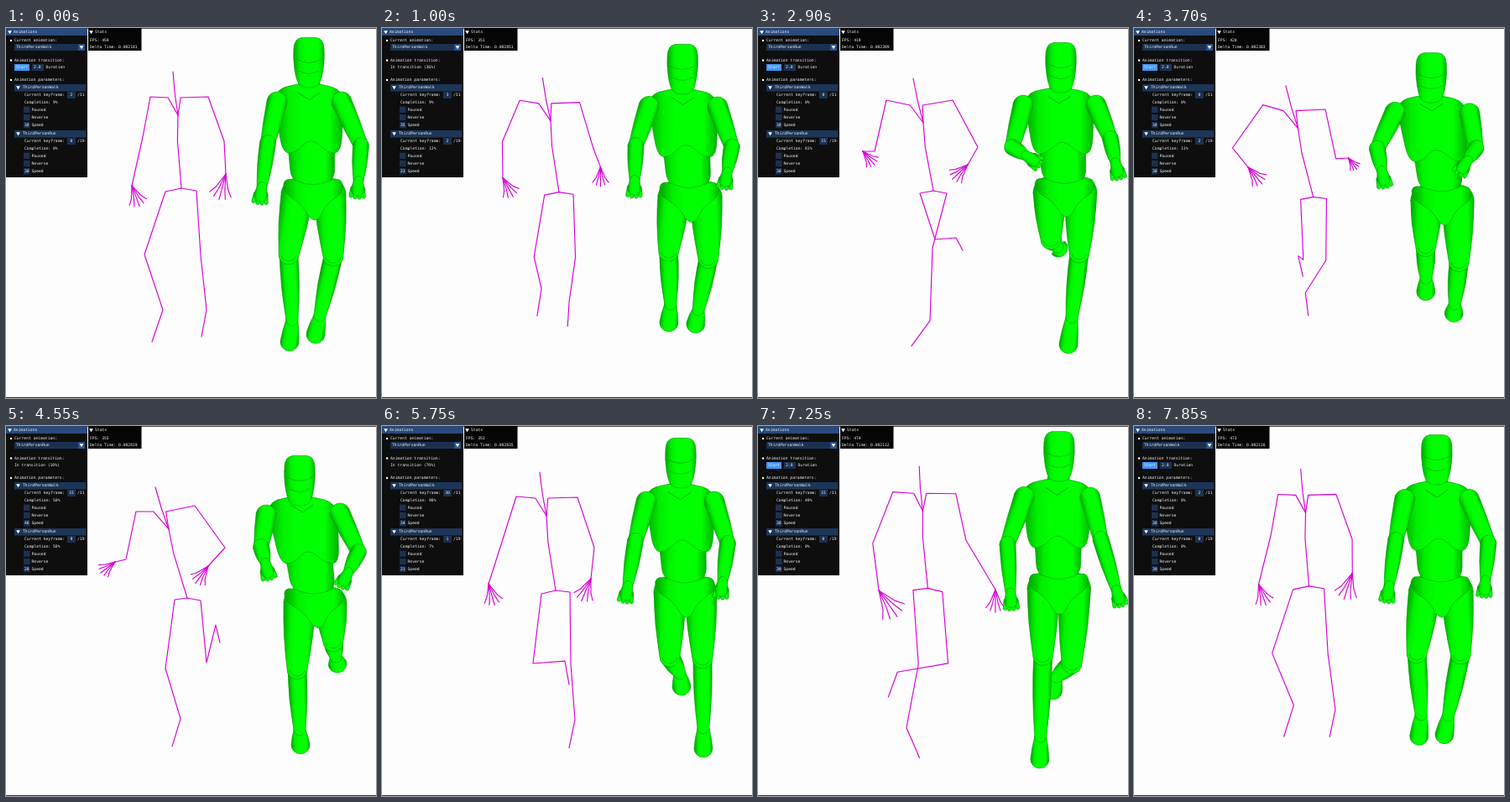
These frames come from a looping animation (441 by 441 pixels, 7.9 s). An HTML page with a canvas:

```html
<!DOCTYPE html>
<html lang="en">
<head>
<meta charset="utf-8">
<title>Animation blending</title>
<style>
html, body { margin: 0; width: 100%; height: 100%; overflow: hidden; background: #fdfdfd; }
canvas { display: block; width: 441px; height: 441px; }
</style>
</head>
<body>
<canvas id="stage"></canvas>
<script>
const LOOP = 7900, STEP = 50, SIZE = 441, SCALE = Math.max(1, window.devicePixelRatio || 1);
const canvas = document.getElementById('stage');
canvas.width = canvas.height = SIZE * SCALE;
const ctx = canvas.getContext('2d');

// ---------- poses ----------
const points = (...n) => n.flatMap((x, i) => i % 2 ? [] : [[x, n[i + 1]]]);
const mix = (a, b, k) => a.map(([x, y], i) => [x + (b[i][0] - x) * k, y + (b[i][1] - y) * k]);

// Swaps the sides; arms reflect about the shoulders, legs about the hips.
function mirror(pose, mid, arm) {
  const n = (pose.length - mid) / 2;
  const L = pose.slice(mid, mid + n), R = pose.slice(mid + n);
  const flip = side => side.map(([x, y], i) => {
    const k = i < arm ? 0 : arm;
    return [L[k][0] + R[k][0] - x, y];
  });
  return [...pose.slice(0, mid), ...flip(R), ...flip(L)];
}

// Periodic cubic through keys [phase, pose].
function cycle(keys, phase) {
  const n = keys.length;
  const key = i => {
    const turn = Math.floor(i / n), [t, p] = keys[i - turn * n];
    return [t + turn, p];
  };
  let i = -1;
  while (key(i + 1)[0] <= phase) i++;
  const [k0, k1, k2, k3] = [i - 1, i, i + 1, i + 2].map(key);
  const d = k2[0] - k1[0], u = (phase - k1[0]) / d, u2 = u * u, u3 = u2 * u;
  const value = (j, c) => {
    const a = k0[1][j][c], b = k1[1][j][c], e = k2[1][j][c], f = k3[1][j][c];
    const m1 = (e - a) / (k2[0] - k0[0]) * d, m2 = (f - b) / (k3[0] - k1[0]) * d;
    return (2 * u3 - 3 * u2 + 1) * b + (u3 - 2 * u2 + u) * m1 + (3 * u2 - 2 * u3) * e + (u3 - u2) * m2;
  };
  return k1[1].map((_, j) => [value(j, 0), value(j, 1)]);
}

function rig(mid, arm, { land, swing, pass, drive, push, float }) {
  const m = p => mirror(p, mid, arm);
  const run = [[.002, m(push)], [.315, m(float)], [.386, drive], [.502, push], [.815, float], [.886, m(drive)]];
  // The passing pose was seen at 35% run; take the run share out of it.
  const step = mix(cycle(run, .027), pass, 1 / .651);
  const walk = [[.027, step], [.095, land], [.408, m(swing)], [.527, m(step)], [.595, m(land)], [.908, swing]];
  return (phase, k) => mix(cycle(walk, phase), cycle(run, phase), k);
}

// head, neck, pelvis, then per side: shoulder, elbow, wrist, hand, hip, knee, ankle, toe
const stickPose = rig(3, 4, {
  land: points(199,52, 205,104, 209,191,
    172,82, 163,130, 150,188, 159,212, 190,195, 165,270, 187,336, 174,374,
    241,82, 260,135, 262,174, 254,204, 227,194, 232,271, 239,336, 233,368),
  swing: points(192,58, 198,111, 205,199,
    158,89, 129,140, 103,178, 98,200, 189,202, 195,275, 227,290, 234,318,
    234,88, 255,145, 271,196, 268,218, 222,202, 211,283, 208,368, 197,405),
  pass: points(188,55, 196,107, 207,196,
    160,84, 143,138, 127,188, 134,213, 190,200, 180,283, 218,280, 223,308,
    233,85, 253,145, 249,182, 238,208, 224,198, 225,284, 230,350, 223,384),
  drive: points(177,68, 192,120, 214,201,
    158,96, 157,150, 133,178, 137,198, 197,205, 182,282, 185,366, 174,398,
    223,93, 255,150, 226,154, 206,170, 231,204, 242,263, 256,243, 258,259),
  push: points(178,73, 194,123, 216,205,
    155,102, 143,159, 130,162, 113,175, 201,207, 190,289, 208,349, 198,382,
    225,95, 261,145, 241,167, 226,187, 232,208, 239,282, 250,237, 255,258),
  float: points(185,60, 197,113, 209,194,
    153,86, 139,147, 125,147, 139,163, 193,197, 211,252, 236,250, 244,265,
    232,86, 262,142, 250,163, 232,180, 225,197, 208,262, 205,349, 183,379)
});

// head, then per side: shoulder, elbow, wrist, hip, knee, ankle, toe
const bodyPose = rig(1, 3, {
  land: points(361,41,
    323,88, 312,137, 305,189, 347,198, 337,270, 341,348, 338,374,
    400,88, 423,140, 420,182, 386,198, 390,272, 374,343, 369,365),
  swing: points(360,48,
    318,94, 291,150, 281,180, 345,203, 350,275, 360,306, 360,319,
    401,94, 417,150, 422,195, 385,203, 383,280, 377,385, 377,406),
  pass: points(356,44,
    315,90, 302,137, 293,190, 343,198, 343,275, 355,295, 357,310,
    396,90, 412,140, 406,185, 380,198, 382,277, 383,360, 383,384),
  drive: points(350,58,
    318,100, 312,143, 306,180, 350,209, 347,287, 346,366, 347,396,
    398,98, 420,148, 402,157, 387,207, 389,245, 382,258, 380,269),
  push: points(350,65,
    310,106, 304,144, 309,163, 350,211, 347,290, 350,362, 351,380,
    398,104, 420,150, 408,174, 387,211, 390,257, 393,275, 395,283),
  float: points(361,47,
    316,92, 303,142, 319,152, 347,196, 349,252, 357,261, 358,262,
    403,92, 420,132, 426,160, 385,196, 383,268, 374,345, 370,377)
});

// ---------- timeline ----------
const WALK = 1.033, RUN = .633, GAP = WALK - RUN;
function stateAt(t) {
  const turns = (a, b) => 2 / GAP * Math.abs(Math.log(a / b));
  if (t < 280) return { phase: .095 + t / 1033, w: 0, from: 'Walk' };
  if (t < 2280) {
    const p = (t - 280) / 2000, c = WALK - GAP * p;
    return { phase: .361 + turns(WALK, c), w: p, p, c, from: 'Walk', walkLag: -.04 * p, runLag: .03 * p };
  }
  if (t < 4350) return { phase: 2.81 + (t - 2280) / 617, w: 1, from: 'Run' };
  if (t < 6350) {
    const p = (t - 4350) / 2000, c = RUN + GAP * p;
    return { phase: 6.196 + turns(RUN, c), w: 1 - p, p, c, from: 'Run', walkLag: .005 - .065 * p, runLag: .07 * p };
  }
  return { phase: 8.614 + (t - 6350) / 1020, w: 0, from: 'Walk' };
}

// ---------- stick figure ----------
function line(...pts) {
  ctx.beginPath();
  pts.forEach(([x, y]) => ctx.lineTo(x, y));
  ctx.stroke();
}

function drawStick(p) {
  const [head, neck, pelvis] = p;
  const lean = (head[0] - neck[0]) * .65;
  ctx.strokeStyle = '#d400d4';
  ctx.lineWidth = 1.15;
  ctx.lineJoin = ctx.lineCap = 'round';
  line(head, [(head[0] + neck[0]) / 2 - .8, (head[1] + neck[1]) / 2], neck,
    [neck[0] * .65 + pelvis[0] * .35 - 2, neck[1] * .65 + pelvis[1] * .35], pelvis);
  [3, 11].forEach((i, side) => {
    const [sh, el, wr, ha, hip, kn, an, to] = p.slice(i, i + 8);
    line(neck, [neck[0] + (side ? 7 : -8) + lean, neck[1] - 21], sh, el, wr);
    line(pelvis, hip, kn, an, to);
    const dir = Math.atan2(ha[1] - wr[1], ha[0] - wr[0]), len = Math.hypot(ha[0] - wr[0], ha[1] - wr[1]);
    for (let f = -2; f <= 2; f++) {
      const joint = (a, r) => [wr[0] + Math.cos(dir + a) * len * r, wr[1] + Math.sin(dir + a) * len * r];
      line(wr, joint(f * .2, .62), joint(f * .24, 1.02 - Math.abs(f) * .05));
    }
  });
}

// ---------- mannequin ----------
const DARK = '#009a00';
function paint(x0, y0, x1, y1) {
  const g = ctx.createLinearGradient(x0, y0, x1, y1);
  [[0, '#00a000'], [.22, '#00f000'], [.4, '#00ff00'], [.8, '#00ff00'], [1, '#00b000']].forEach(s => g.addColorStop(...s));
  ctx.fillStyle = g;
  ctx.fill();
  ctx.strokeStyle = DARK;
  ctx.lineWidth = .6;
  ctx.stroke();
}

function limb([ax, ay], [bx, by], ra, rb, bulge = 0) {
  const ang = Math.atan2(by - ay, bx - ax), q = Math.PI / 2;
  const nx = Math.sin(ang), ny = -Math.cos(ang), s = nx < 0 ? -1 : 1;
  const mx = (ax + bx) / 2, my = (ay + by) / 2, r = (ra + rb) / 2 + bulge, w = Math.max(ra, rb) * s;
  ctx.beginPath();
  ctx.arc(ax, ay, ra, ang + q, ang + 3 * q);
  ctx.quadraticCurveTo(mx + nx * r, my + ny * r, bx + nx * rb, by + ny * rb);
  ctx.arc(bx, by, rb, ang - q, ang + q);
  ctx.quadraticCurveTo(mx - nx * r, my - ny * r, ax - nx * ra, ay - ny * ra);
  ctx.closePath();
  paint(mx - nx * w, my - ny * w, mx + nx * w, my + ny * w);
}

function blob(pts) {
  const mid = (a, b) => [(a[0] + b[0]) / 2, (a[1] + b[1]) / 2];
  ctx.beginPath();
  ctx.moveTo(...mid(pts[pts.length - 1], pts[0]));
  pts.forEach((p, i) => ctx.quadraticCurveTo(...p, ...mid(p, pts[(i + 1) % pts.length])));
  ctx.closePath();
  const xs = pts.map(p => p[0]);
  paint(Math.min(...xs), 0, Math.max(...xs), 0);
}

function drawLeg([, , , hip, kn, an, to]) {
  limb(an, to, 7, 11, 1);
  limb(kn, an, 11, 7, 3);
  limb(hip, kn, 19, 12, 3);
  ctx.beginPath();
  ctx.ellipse(kn[0], kn[1], 9, 8, 0, .2, Math.PI - .2);
  ctx.stroke();
}

function drawArm([sh, el, wr]) {
  const d = Math.atan2(wr[1] - el[1], wr[0] - el[0]);
  const reach = (a, r) => [wr[0] + Math.cos(d + a) * r, wr[1] + Math.sin(d + a) * r];
  limb(sh, el, 12, 8.5, 1);
  limb(el, wr, 9.5, 6, 2);
  for (let f = -1.5; f <= 1.5; f++) limb(reach(f * .35, 11), reach(f * .26, 20), 3, 2.2);
  limb(wr, reach(0, 10), 5.5, 8);
}

function drawBody(p) {
  const head = p[0], L = p.slice(1, 8), R = p.slice(8);
  const mid = i => [(L[i][0] + R[i][0]) / 2, (L[i][1] + R[i][1]) / 2];
  const s = mid(0), h = mid(3);
  const torso = (...n) => points(...n).map(([k, u]) => [s[0] + (h[0] - s[0]) * u + k, s[1] + (h[1] - s[1]) * u]);

  [L, R].sort((a, b) => a[6][1] - b[6][1]).forEach(drawLeg);
  blob(torso(-29,.32, 29,.32, 27,.6, 26,.86, 0,.92, -26,.86, -27,.6));
  blob(torso(-33,.8, 0,.93, 33,.8, 37,.98, 15,1.1, 5,1.28, -5,1.28, -15,1.1, -37,.98));
  limb([head[0], head[1] + 20], [s[0], s[1] - 6], 12, 15);
  blob(torso(-14,-.2, 14,-.2, 42,-.12, 39,.2, 35,.55, 20,.56, 0,.38, -20,.56, -35,.55, -39,.2, -42,-.12));
  ctx.lineWidth = .8;
  line(...torso(-13,-.1, 0,-.02, 13,-.1));
  drawArm(L);
  drawArm(R);

  const [x, y] = head;
  blob(points(x,y - 30, x + 17,y - 29, x + 19,y - 5, x + 15,y + 22, x + 8,y + 30,
    x - 8,y + 30, x - 15,y + 22, x - 19,y - 5, x - 17,y - 29));
  ctx.beginPath();
  ctx.moveTo(x - 15, y - 4);
  ctx.quadraticCurveTo(x, y + 5, x + 15, y - 4);
  ctx.moveTo(x - 12, y + 10);
  ctx.quadraticCurveTo(x, y + 17, x + 12, y + 10);
  ctx.stroke();
}

// ---------- panels ----------
function box(x, y, w, h, color) {
  ctx.fillStyle = color;
  ctx.fillRect(x, y, w, h);
}
function text(str, x, y) {
  ctx.fillStyle = '#f4f4f4';
  ctx.fillText(str, x, y);
}
function arrow(x, y) {
  ctx.fillStyle = '#fff';
  ctx.beginPath();
  ctx.moveTo(x - 2.4, y - 1.8);
  ctx.lineTo(x + 2.4, y - 1.8);
  ctx.lineTo(x, y + 2.2);
  ctx.fill();
}
function bullet(str, y) {
  ctx.fillStyle = '#fff';
  ctx.beginPath();
  ctx.arc(6, y, 1.2, 0, 7);
  ctx.fill();
  text(str, 10, y);
}

const FIELD = '#1c3150';
function clipPanel(y, name, frames, phase, speed) {
  const part = phase - Math.floor(phase);
  box(10, y - 4, 85, 8.5, '#1d3658');
  arrow(14.5, y);
  text(name, 20, y);
  text('Current keyframe:', 22, y + 9);
  box(73, y + 5, 10, 8, FIELD);
  const key = String(Math.floor(part * frames));
  text(key, 78 - key.length * 1.42, y + 9);
  text('/' + frames, 85, y + 9);
  text(`Completion: ${Math.floor(part * 100)}%`, 22, y + 17.5);
  ['Paused', 'Reverse', 'Speed'].forEach((label, i) => {
    const row = y + 26.3 + i * 9.2;
    box(21, row - 3.6, 7.5, 7.2, FIELD);
    text(label, 30.5, row);
  });
  text(speed, 22, y + 44.7);
}

function drawPanels(t, s) {
  const blending = s.p !== undefined;
  ctx.font = '4.72px "DejaVu Sans Mono", "Liberation Mono", monospace';
  ctx.textBaseline = 'middle';

  box(0, 0, 97, 178, '#0e0e0f');
  box(0, 0, 97, 9, '#294a7a');
  arrow(4.5, 5);
  text('Animations', 9, 5);
  bullet('Current animation:', 15);
  box(10, 19, 84, 8, FIELD);
  box(86, 19, 8, 8, '#2b5288');
  arrow(90, 23);
  text('ThirdPerson' + s.from, 12, 23.2);
  bullet('Animation transition:', 38.5);
  if (blending) text(`In transition (${Math.round(s.p * 100)}%)`, 10, 46.8);
  else {
    box(10, 43, 18, 8, '#4296fa');
    text('Start', 12, 47);
    box(31, 43, 14, 8, FIELD);
    text('2.0', 33, 47);
    text('Duration', 47.5, 47);
  }
  bullet('Animation parameters:', 62);
  const walkOn = blending || s.from === 'Walk', runOn = blending || s.from === 'Run';
  clipPanel(71, 'ThirdPersonWalk', 31, walkOn ? s.phase + (s.walkLag || 0) : 0, blending ? Math.round(31 / s.c) : 30);
  clipPanel(126, 'ThirdPersonRun', 19, runOn ? s.phase + (s.runLag || 0) : 0, blending ? Math.round(19 / s.c - .1) : 30);

  const base = blending ? 353 : s.from === 'Run' ? 421 : t < 280 ? 459 : 473;
  const fps = base + Math.round(2 * Math.sin(Math.floor(t / 500) * 2.3));
  box(98, 0, 63.5, 27, '#050505');
  arrow(101.5, 5);
  text('Stats', 106, 5);
  text('FPS: ' + fps, 100, 15);
  text('Delta Time: ' + (1 / fps + 2e-6).toFixed(6), 100, 22.5);
}

// ---------- loop ----------
function draw(now) {
  const t = Math.floor(now % LOOP / STEP) * STEP;
  const s = stateAt(t), phase = s.phase % 1, blend = Math.min(1, s.w / .86);
  ctx.setTransform(SCALE, 0, 0, SCALE, 0, 0);
  box(0, 0, SIZE, SIZE, '#fdfdfd');
  drawStick(stickPose(phase, blend));
  drawBody(bodyPose(phase, blend));
  box(0, 0, SIZE, .8, '#222');
  box(0, 440, SIZE, 1, '#333');
  drawPanels(t, s);
}
const start = performance.now();
function tick() {
  draw(performance.now() - start);
  requestAnimationFrame(tick);
}
tick();
</script>
</body>
</html>
```
